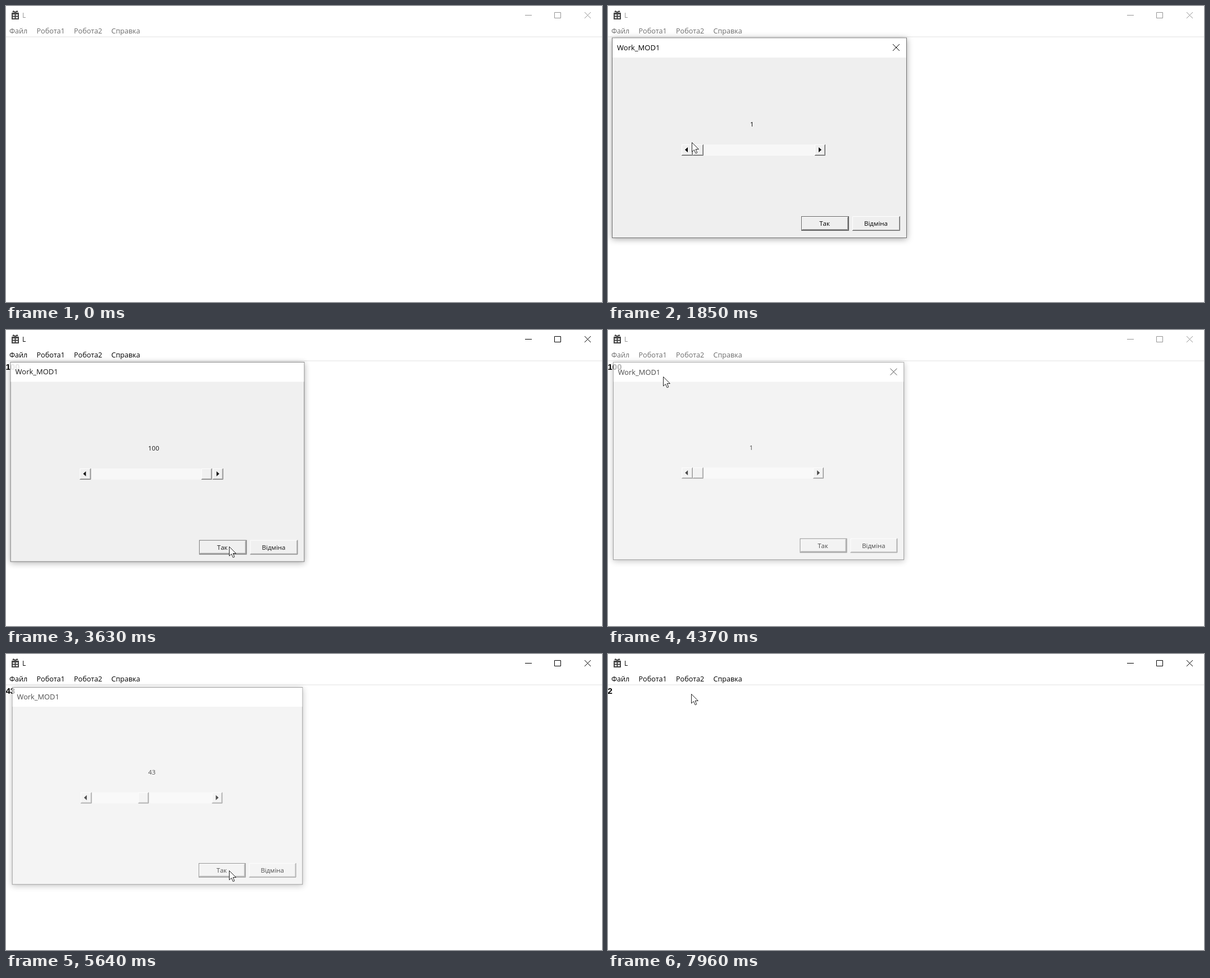
An HTML page that plays this animation: 1061x528 px, repeating every 7.99 s.

```html
<!DOCTYPE html>
<html lang="uk">
<head>
<meta charset="utf-8">
<style>
  html, body { margin: 0; width: 100%; height: 100%; overflow: hidden; background: #fff; }
  svg { display: block; font-family: "Open Sans", "Noto Sans", sans-serif; }
  .line { fill: none; stroke: currentColor; }
  .menu { font-size: 12.6px; }
  .title { font-size: 13px; }
  .control { font-size: 11.5px; }
  #result { font: bold 15px "Liberation Sans", sans-serif; }
  #frame { filter: drop-shadow(0 2px 6px rgba(0, 0, 0, .34)); }
</style>
</head>
<body>
<svg width="1061" height="528" viewBox="0 0 1061 528">
  <rect width="1061" height="528" fill="#fff"/>
  <g fill="#444">
    <path d="M10 12H23V24H10Z M12 15V17.5H15.5V15Z M17.5 15V17.5H21V15Z M12 19.5V22H15.5V19.5Z M17.5 19.5V22H21V19.5Z" fill-rule="evenodd"/>
    <path d="M16.5 12L11 10.5L13 8L16.5 10L20 8L22 10.5Z"/>
  </g>
  <g id="caption">
    <text x="29" y="21" font-size="12" fill="currentColor">L</text>
    <path class="line" d="M924 16.5H936 M976.5 11.5H987.5V21.5H976.5Z M1030 11L1041 22M1041 11L1030 22"/>
  </g>
  <g id="menu" class="menu" fill="currentColor">
    <text x="6" y="49">Файл</text>
    <text x="54.5" y="49">Робота1</text>
    <text x="121" y="49">Робота2</text>
    <text x="187.5" y="49">Справка</text>
  </g>
  <rect y="54" width="1061" height="2" fill="#f0f0f0"/>
  <text id="result" x="-.5" y="71"></text>

  <g id="dialog">
    <rect id="frame" x="7.5" y="57" width="524" height="356.5" fill="#efefef" stroke="#707070"/>
    <rect x="8" y="57.5" width="523" height="34.5" fill="#fff"/>
    <text class="title" x="16" y="79">Work_MOD1</text>
    <path id="close" class="line" d="M507 68L519 80M519 68L507 80" stroke="#222"/>
    <text id="value" class="control" x="253" y="215"></text>
    <rect x="131" y="247" width="256" height="20" fill="#f7f7f7"/>
    <g id="controls"></g>
    <g id="thumb"></g>
    <path d="M142 252V261L137 256.5Z M375 252V261L380 256.5Z"/>
    <rect x="344.5" y="375.5" width="84" height="25" fill="none" stroke="#646464"/>
    <g class="control" text-anchor="middle">
      <text x="385.5" y="392">Так</text>
      <text x="477" y="392">Відміна</text>
    </g>
  </g>

  <circle id="press" r="14" fill="#ff0" fill-opacity=".52"/>
  <path id="cursor" d="M.5 .5V17L4.4 13.5L7.2 19.8L9.8 18.7L7.1 12.5H12.4Z" fill="#fff" stroke="#222"/>
</svg>
<script>
const LOOP = 7990;
const $ = id => document.getElementById(id);
const clamp = v => Math.min(1, Math.max(0, v));

// A raised classic button: light top-left edges, dark bottom-right edges.
function bevel(x, y, w, h) {
  const edge = (color, d) => `<path fill="none" stroke="${color}" d="${d}"/>`;
  return `<rect x="${x}" y="${y}" width="${w}" height="${h}" fill="#efefef"/>`
    + edge('#fff', `M${x + .5} ${y + h}V${y + .5}H${x + w}`)
    + edge('#a0a0a0', `M${x + 1} ${y + h - 1.5}H${x + w - 1.5}V${y + 1}`)
    + edge('#696969', `M${x} ${y + h - .5}H${x + w - .5}V${y}`);
}

$('controls').innerHTML = bevel(131, 247, 20, 20) + bevel(368, 247, 19, 20)
  + bevel(345, 376, 83, 24) + bevel(435, 375, 85, 26);
$('thumb').innerHTML = bevel(151, 247, 19, 20);

const TRACK = 197, OPENING = 136, CLOSING = 115;
const ENTRY = [300, 529], MENU = [86, 46], THUMB = [154, 257], ARROW = [378, 249];
const OK = [397, 386], EXIT = [148, 71];
const dragged = value => [THUMB[0] + (value - 1) / 99 * TRACK, THUMB[1]];

// Each visit: open from the menu, move to a control, change the value, confirm.
const visits = [
  { open: 955, leave: 1060, grab: 2000, drop: 2500, close: 3620, value: 100, from: THUMB, to: dragged(100) },
  { open: 4275, leave: 4180, grab: 4900, drop: 5230, close: 5605, value: 43, from: THUMB, to: dragged(43) },
  { open: 6235, leave: 6230, grab: 6660, drop: 6800, close: 7580, value: 2, from: ARROW, to: ARROW }
];

const stops = [
  { at: 100, point: ENTRY },
  ...visits.flatMap(v => [
    { at: Math.min(v.open, v.leave) - 110, point: MENU },
    { at: v.leave, point: MENU },
    { at: v.grab, point: v.from },
    { at: v.drop, point: v.to },
    { at: v.drop + 80, point: v.to },
    { at: v.close - 80, point: OK },
    { at: v.close + 40, point: OK }
  ]),
  { at: 7940, point: EXIT }
];

function pointer(t) {
  const next = stops.find(s => s.at > t);
  if (!next) return EXIT;
  const last = stops[stops.indexOf(next) - 1];
  if (!last) return ENTRY;
  const u = (t - last.at) / (next.at - last.at), eased = u * u * (3 - 2 * u);
  return last.point.map((p, i) => Math.round(p + (next.point[i] - p) * eased));
}

function isPressed(t) {
  const within = (a, b) => t >= a && t < b;
  return visits.some(v => within(v.open - 100, v.open - 10)
    || within(v.grab, v.drop + 80) || within(v.close - 80, v.close));
}

function valueAt(visit, t, x) {
  if (t < visit.grab) return 1;
  if (t >= visit.drop || visit.from === ARROW) return visit.value;
  return Math.round(1 + 99 * clamp((x - THUMB[0]) / TRACK));
}

function drawDialog(visit, t, x) {
  const closing = visit && t >= visit.close;
  const shown = !visit ? 0
    : closing ? 1 - clamp((t - visit.close) / CLOSING)
    : clamp((t - visit.open) / OPENING);
  $('dialog').style.display = shown ? '' : 'none';
  if (!shown) return;

  const value = valueAt(visit, t, x);
  const scale = 1 - .08 * (1 - shown) ** 1.5;
  const shift = closing ? 0 : -5 * (1 - shown);
  $('dialog').setAttribute('opacity', shown);
  $('dialog').setAttribute('transform',
    `translate(${269.5 + shift} ${235.5 + shift}) scale(${scale}) translate(-269.5 -235.5)`);
  $('close').style.display = closing ? 'none' : '';
  $('value').textContent = value;
  $('thumb').setAttribute('transform', `translate(${Math.round((value - 1) / 99 * TRACK)} 0)`);
}

function draw(t) {
  const [x, y] = pointer(t);
  const visit = visits.filter(v => t >= v.open).pop();
  const finished = visits.filter(v => t >= v.close).pop();
  const active = visit ? t >= visit.close : t >= visits[0].open - 100;

  $('caption').style.color = active ? '#000' : '#949494';
  $('menu').style.color = active ? '#000' : '#6d6d6d';
  $('result').textContent = finished ? finished.value : '';
  drawDialog(visit, t, x);

  const place = `translate(${x} ${y})`;
  $('cursor').setAttribute('transform', place);
  $('press').setAttribute('transform', place);
  $('press').style.display = isPressed(t) ? '' : 'none';
}

const start = performance.now();
function tick() {
  draw((performance.now() - start) % LOOP);
  requestAnimationFrame(tick);
}
tick();
</script>
</body>
</html>
```
